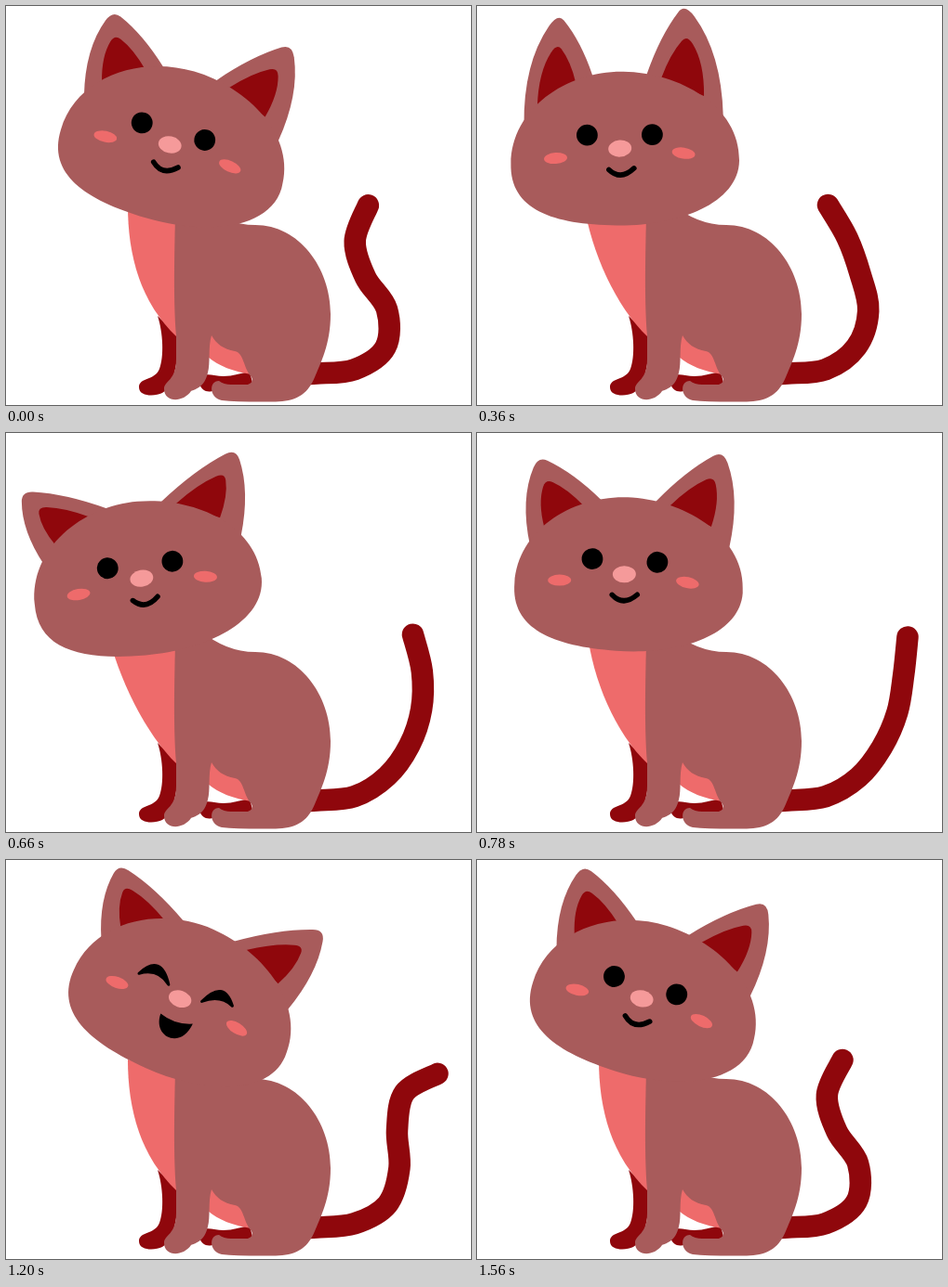
Animation of 500 by 430 pixels, one loop 1.58 s. Source, as an HTML page with a canvas:

```html
<!DOCTYPE html>
<html lang="en">
<head>
<meta charset="utf-8">
<title>Cat</title>
<style>
html, body { margin: 0; width: 100%; height: 100%; overflow: hidden; background: #fff; }
canvas { display: block; }
</style>
</head>
<body>
<canvas id="stage" width="500" height="430"></canvas>
<script>
const ctx = document.getElementById('stage').getContext('2d');
const LOOP = 1580;
const COAT = '#a85b5b', DARK = '#8f070c', PINK = '#ee6b6b', NOSE = '#f59a9a', BLACK = '#000';
const PIVOT = [180, 233];
const REST_ANGLE = -1.6;

// Turning points as [time, value], eased in and out between them
const HEAD_TILT = [[70, 14], [570, -9.5], [900, 7.5], [1300, 25]];
const EAR_SPREAD = [[340, 0], [560, 1.1], [920, .4], [1300, 1.05]];

// Tail bones from root to tip: mean heading, swing (degrees), time of the widest swing
const BONE = 41;
const TAIL = [[6, 0, 0], [33, 4, 200], [70, 18, -10], [95, 29, 30], [93, 20, 215], [76, 46, 430]];

const HEAD = new Path2D('M155 71C215 71 281 106 281 165C281 212 215 237 150 237C82 237 35 222 35.5 172C35 112 95 71 155 71Z');
const BODY = new Path2D('M182 225L208 212Q236 236 268 236C315 236 349 282 349 332C349 365 338 385 332 400' +
  'C324 420 310 426 290 426.5Q250 427 232 425C218 422 218 404 229 404Q234 408 242 408L260 408Q267 405 264 400' +
  'C255 390 256 374 246 372C234 370 226 364 221 355C217 368 220 385 217 395C214 410 204 413 199 415' +
  'C190 428 170 427 170 413C170 403 183 405 183 380L183 355C180 320 181 270 182 225Z');
const FAR_LEGS = new Path2D('M163 334C169 352 170 378 165 391C160 404 143 400 143 411C143 421 160 421 168 417C180 410 184 390 186 356Z' +
  'M208 406C207 397 216 396 224 398C240 401 250 396 262 394L266 410L225 414C218 417 210 416 208 406Z');
const BELLY = new Path2D('M219 352L250 368L264 397C245 394 228 388 217 378Z');
const SMILE = new Path2D('M141 177Q154 189 168 175');
const LAUGH = new Path2D('M140 177C142 204 176 204 176 173Q159 182 140 177Z');
const HAPPY_EYES = new Path2D('M101 147Q114 117 135 145Q118 133 101 147ZM175 147Q187 115 207 138Q190 132 175 147Z');

const radians = degrees => degrees * Math.PI / 180;
const mix = (a, b, u) => [a[0] + (b[0] - a[0]) * u, a[1] + (b[1] - a[1]) * u];
const wave = (t, peak) => Math.cos(2 * Math.PI * (t - peak) / LOOP);

function ease(keys, t) {
  const next = keys.findIndex(key => key[0] > t);
  const to = keys[Math.max(next, 0)];
  const from = keys.at(next < 0 ? -1 : next - 1);
  const span = (to[0] - from[0] + LOOP) % LOOP;
  const u = (t - from[0] + LOOP) % LOOP / span;
  return from[1] + (to[1] - from[1]) * (1 - Math.cos(Math.PI * u)) / 2;
}

function fill(color, path) {
  ctx.fillStyle = color;
  path ? ctx.fill(path) : ctx.fill();
}

function oval(color, x, y, rx, ry, degrees = 0) {
  ctx.beginPath();
  ctx.ellipse(x, y, rx, ry, radians(degrees), 0, 2 * Math.PI);
  fill(color);
}

// Midpoint of an ear side, pushed away from the ear's inside
function bulge(from, to, inside, amount) {
  const dx = to[0] - from[0], dy = to[1] - from[1], len = Math.hypot(dx, dy);
  const mid = mix(from, to, .5);
  const side = Math.sign(dx * (inside[1] - from[1]) - dy * (inside[0] - from[0]));
  return [mid[0] + side * dy / len * amount, mid[1] - side * dx / len * amount];
}

function ear(color, outer, tip, inner, outerBulge, innerBulge, push, sharpness) {
  const base = mix(outer, inner, .5);
  const top = mix(base, tip, 1 + push / Math.hypot(tip[0] - base[0], tip[1] - base[1]));
  const c1 = bulge(outer, top, inner, outerBulge);
  const c2 = bulge(inner, top, outer, innerBulge);
  ctx.beginPath();
  ctx.moveTo(...outer);
  ctx.quadraticCurveTo(...c1, ...mix(c1, top, sharpness));
  ctx.quadraticCurveTo(...top, ...mix(c2, top, sharpness));
  ctx.quadraticCurveTo(...c2, ...inner);
  fill(color);
}

function drawEars(spread) {
  const coatBulge = 20 - 8 * spread, darkBulge = 10 - 4 * spread;
  ear(COAT, [49, 130], [85 - 48 * spread, 17 + 40 * spread], [122, 76], coatBulge, 7, 9, .74);
  ear(DARK, [63, 110], [84 - 34 * spread, 45 + 26 * spread], [104, 84], darkBulge, 5, 4, .68);
  ear(COAT, [263, 117], [219 + 44 * spread, 3 + 27 * spread], [180, 74], coatBulge, 7, 7, .74);
  ear(DARK, [242, 96], [222 + 28 * spread, 33 + 18 * spread], [196, 77], darkBulge, 5, 3, .68);
}

function drawFace(laughing) {
  oval(PINK, 83.5, 165.5, 12.5, 6, -5);
  oval(PINK, 221, 158, 12.5, 6, 8);
  oval(NOSE, 152.5, 154, 12.5, 9, -5);
  ctx.strokeStyle = BLACK;
  ctx.lineCap = ctx.lineJoin = 'round';
  if (laughing) {
    ctx.lineWidth = 3;
    fill(BLACK, HAPPY_EYES);
    ctx.stroke(HAPPY_EYES);
    fill(BLACK, LAUGH);
  } else {
    oval(BLACK, 117, 140, 11.4, 11.4);
    oval(BLACK, 187, 138.5, 11.4, 11.4);
    ctx.lineWidth = 5.5;
    ctx.stroke(SMILE);
  }
}

function drawTail(t) {
  const joints = [[315, 397], [334, 396]];
  for (const [heading, swing, peak] of TAIL) {
    const [x, y] = joints.at(-1);
    const angle = radians(heading + swing * wave(t, peak));
    joints.push([x + BONE * Math.cos(angle), y - BONE * Math.sin(angle)]);
  }
  const joint = i => joints[Math.max(0, Math.min(joints.length - 1, i))];
  ctx.beginPath();
  ctx.moveTo(...joints[0]);
  for (let i = 0; i < joints.length - 1; i++) {
    const [a, b, c, d] = [joint(i - 1), joint(i), joint(i + 1), joint(i + 2)];
    ctx.bezierCurveTo(
      b[0] + (c[0] - a[0]) / 6, b[1] + (c[1] - a[1]) / 6,
      c[0] - (d[0] - b[0]) / 6, c[1] - (d[1] - b[1]) / 6, ...c);
  }
  ctx.strokeStyle = DARK;
  ctx.lineWidth = 23.5;
  ctx.lineCap = 'round';
  ctx.stroke();
}

// The chest fills out as the head leans back
function drawChest(tilt) {
  const full = Math.max(0, Math.min(1, (tilt + 7) / 22));
  ctx.beginPath();
  ctx.moveTo(109 + 22 * full, 215);
  ctx.bezierCurveTo(120 + 11 * full, 262 + 8 * full, 150 - 5 * full, 325 - 5 * full, 184, 357);
  ctx.lineTo(190, 225);
  fill(PINK);
}

function draw(t) {
  const tilt = ease(HEAD_TILT, t);
  ctx.fillStyle = '#fff';
  ctx.fillRect(0, 0, 500, 430);
  drawTail(t);
  fill(DARK, FAR_LEGS);
  drawChest(tilt);
  fill(PINK, BELLY);
  fill(COAT, BODY);

  ctx.save();
  ctx.translate(...PIVOT);
  ctx.rotate(radians(tilt - REST_ANGLE));
  ctx.translate(-PIVOT[0], -PIVOT[1]);
  drawEars(ease(EAR_SPREAD, t));
  fill(COAT, HEAD);
  drawFace(t >= 1080 && t < 1420);
  ctx.restore();
}

const start = performance.now();
function tick() {
  draw((performance.now() - start) % LOOP);
  requestAnimationFrame(tick);
}
tick();
</script>
</body>
</html>
```
